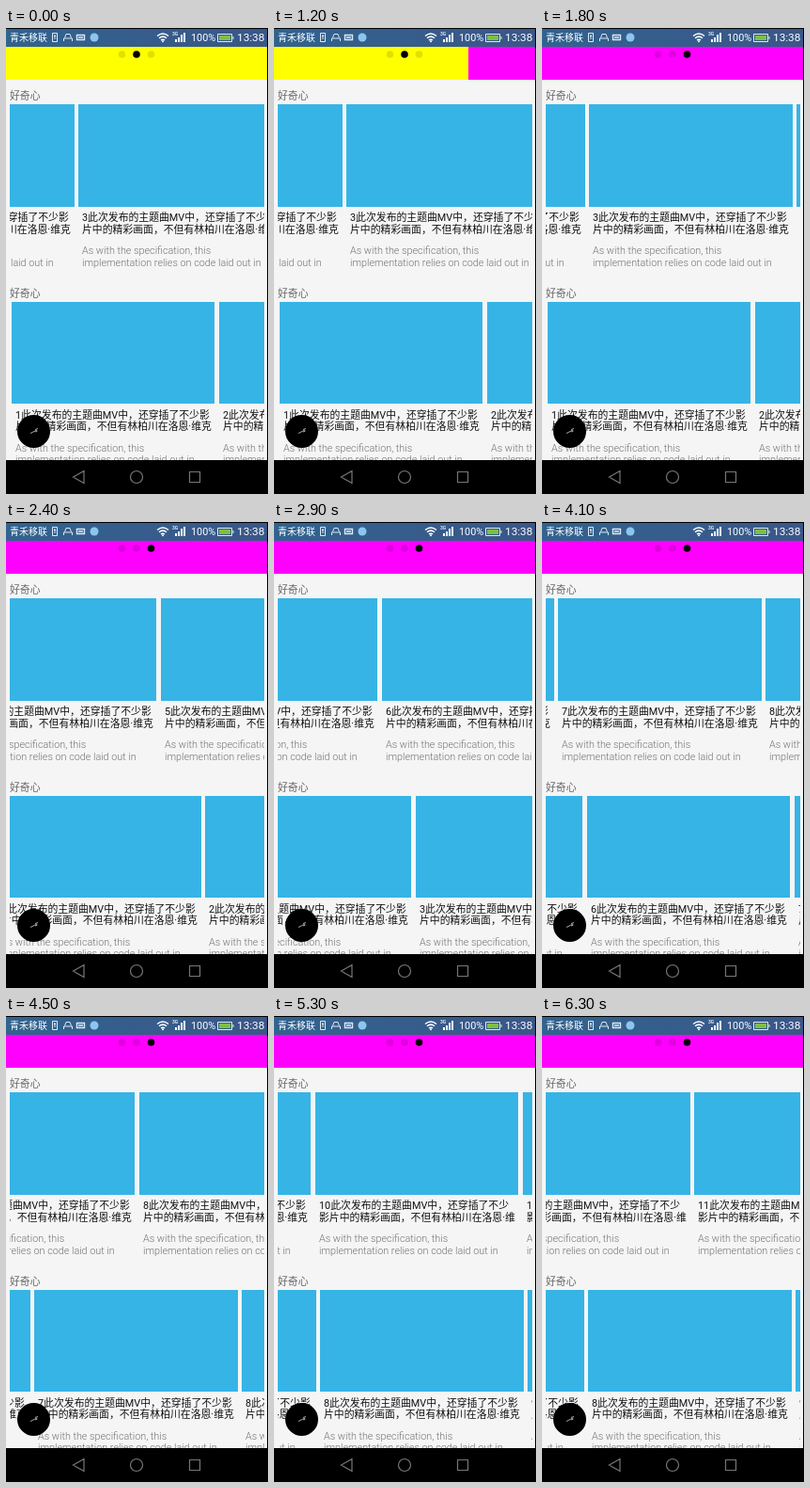
An HTML page with a canvas for the animation above (6400 ms loop, 279 by 495 pixels).

```html
<!DOCTYPE html>
<html lang="zh-CN">
<head>
<meta charset="utf-8">
<style>
  html, body { margin: 0; width: 100%; height: 100%; overflow: hidden; background: #f5f5f5; }
  canvas { display: block; width: 279px; height: 495px; }
</style>
</head>
<body>
<canvas width="279" height="495"></canvas>
<script>
const c = document.querySelector('canvas').getContext('2d');
const LOOP = 6400, STEP = 100;
const PITCH = 221, CARD_W = 216.5, CARD_H = 108.3, FIRST_X = 5.8;
const FAMILY = 'Roboto, "Noto Sans CJK SC", "Noto Sans CJK", sans-serif';

// [time, scroll offset]
const TOP = [[1700, 370.7], [1800, 397.7], [2900, 996], [3700, 1233.7], [4500, 1411], [5300, 1951], [5800, 2053.7]];
const BOTTOM = [[2300, 0], [2900, 297], [3700, 772.7], [4500, 1301.7], [5300, 1503.7]];

// Monotone cubic through the keys, at rest at both ends
function track(keys, t) {
  const last = keys.length - 1;
  if (t <= keys[0][0]) return keys[0][1];
  if (t >= keys[last][0]) return keys[last][1];
  const secant = i => (keys[i + 1][1] - keys[i][1]) / (keys[i + 1][0] - keys[i][0]);
  const slope = i => i === 0 || i === last ? 0 : 2 / (1 / secant(i - 1) + 1 / secant(i));
  const i = keys.findIndex(k => k[0] > t) - 1;
  const [t0, a] = keys[i], [t1, b] = keys[i + 1];
  const d = t1 - t0, u = (t - t0) / d, v = 1 - u;
  return a * v * v * (1 + 2 * u) + b * u * u * (3 - 2 * u)
    + d * u * v * (slope(i) * v - slope(i + 1) * u);
}

// Edges snap to whole pixels
function rect(x, y, w, h, color) {
  const left = Math.round(x), top = Math.round(y);
  c.fillStyle = color;
  c.fillRect(left, top, Math.round(x + w) - left, Math.round(y + h) - top);
}

function disc(x, y, r, color) {
  c.fillStyle = color;
  c.beginPath();
  c.arc(x, y, r, 0, 7);
  c.fill();
}

function text(s, x, y, size, color, weight = 400) {
  c.font = `${weight} ${size}px ${FAMILY}`;
  c.fillStyle = color;
  c.fillText(s, Math.round(x), Math.round(y));
}

function stroke(d, color, width = 1) {
  c.strokeStyle = color;
  c.lineWidth = width;
  c.stroke(new Path2D(d));
}

function statusBar() {
  const blue = c.createLinearGradient(0, 0, 279, 0);
  blue.addColorStop(0, '#31638f');
  blue.addColorStop(1, '#3a5789');
  rect(0, 0, 279, 20, blue);
  text('青禾移联', 4, 14, 10, '#fff', 500);
  stroke('M49.5 5.5h5v9h-5z M51 8.5h2 M52 7v5', '#dfe9f3');
  stroke('M61.5 14v-3h9v3 M62.5 10.5l1.5-4h4l1.5 4', '#dfe9f3');
  stroke('M75.5 7.5h8v5h-8z M77 10h5', '#dfe9f3', 1.4);
  disc(94, 10, 4.5, '#8cc6ee');

  stroke('M161 8.5q6-5 12 0 M163 10.8q4-3.4 8 0 M165 13q2-1.6 4 0', '#fff', 1.5);
  disc(167, 14.3, 1, '#fff');
  text('3G', 177, 8, 5, '#fff', 500);
  for (let i = 0; i < 4; i++) rect(180 + i * 3, 12 - i * 2.3, 2, 3 + i * 2.3, '#fff');
  text('100%', 197, 14, 10.8, '#fff');
  stroke('M225.5 6.5h15v8h-15z M242 9v3', '#dff0d8');
  rect(227, 8, 12, 5, '#7cc043');
  text('13:38', 246, 14, 11.8, '#fff');
}

function pager(t) {
  const u = Math.min(1, Math.max(0, (t - 1100) / 300));
  const p = u * u * (3 - 2 * u);
  const split = 279 * (1 - p);
  rect(0, 20, split, 35, '#ff0');
  rect(split, 20, 279 - split, 35, '#f0f');
  const active = p > 0.5 ? 2 : 1;
  for (let i = 0; i < 3; i++) {
    disc(123.5 + i * 15.5, 28, 3.8, i === active ? '#000' : 'rgba(0,0,0,.12)');
  }
}

function card(n, x, y) {
  const title = n + '此次发布的主题曲MV中，还穿插了不少影片中的精彩画面，不但有林柏川在洛恩·维克';
  rect(x, y, CARD_W, CARD_H, '#36b4e6');
  text(title.slice(0, 20), x + 4, y + 124, 10.85, '#111');
  text(title.slice(20, 40), x + 4, y + 136.3, 10.85, '#111');
  text('As with the specification, this', x + 4, y + 159, 10.8, '#737373', 300);
  text('implementation relies on code laid out in', x + 4, y + 171.3, 10.8, '#737373', 300);
}

function list(y, offset) {
  text('好奇心', 4, y - 5, 10.85, '#666');
  c.save();
  c.beginPath();
  c.rect(4, Math.round(y), 271, 180);
  c.clip();
  const first = Math.max(0, Math.floor(offset / PITCH) - 1);
  for (let i = first; i < first + 4; i++) card(i + 1, FIRST_X + i * PITCH - offset, y);
  c.restore();
}

function floatingButton() {
  disc(29.5, 428.5, 17.5, '#000');
  stroke('M26 430.5l7-3.5 M31 426.5l3-1 M31 429l2.5-1', '#aaa');
}

function navBar() {
  rect(0, 459, 279, 36, '#000');
  stroke('M71.5 477l11.5-6.5v13z M132.5 477a6.5 6.5 0 1 0 13 0a6.5 6.5 0 1 0-13 0z M195.5 471.5h11v11h-11z', '#777', 1.2);
}

function draw(now) {
  const t = Math.floor((now % LOOP) / STEP) * STEP;
  rect(0, 0, 279, 495, '#f5f5f5');
  statusBar();
  pager(t);
  list(81.3, track(TOP, t));
  list(290.9, track(BOTTOM, t));
  floatingButton();
  navBar();
  rect(0, 0, 279, 1, '#000');
  rect(278, 0, 1, 495, '#000');
}

const start = performance.now();
function frame() {
  draw(performance.now() - start);
  requestAnimationFrame(frame);
}
frame();
</script>
</body>
</html>
```
